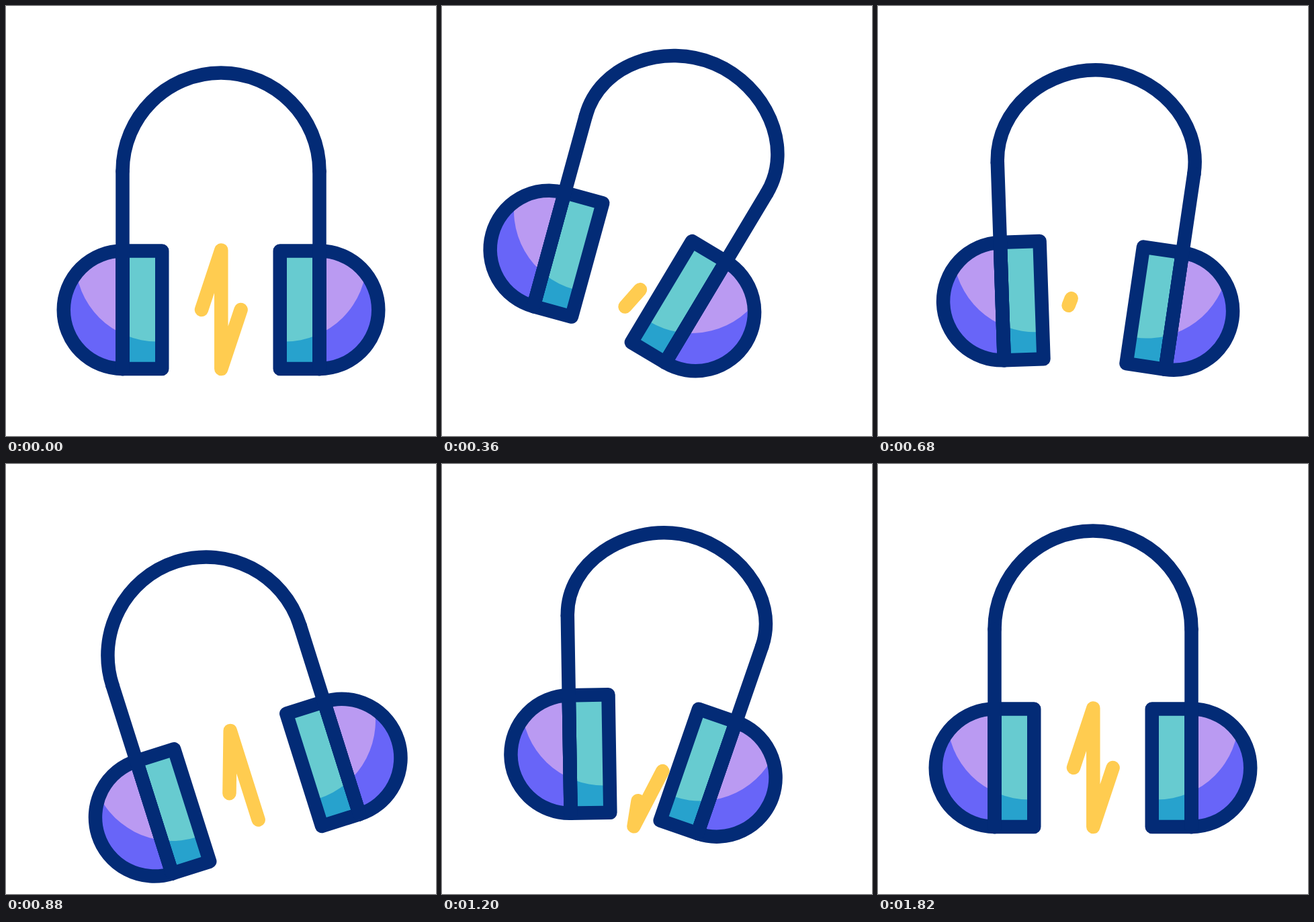
Recreate the animation shown at these times as an HTML page. Size 640 by 640 pixels, loop 2400 ms.

```html
<!DOCTYPE html>
<html lang="en">
<head>
<meta charset="utf-8">
<title>Headphones</title>
<style>
  html, body { margin: 0; width: 100%; height: 100%; overflow: hidden; background: #fff; }
  svg { display: block; width: 100vw; height: 100vh; }
  .line { fill: none; stroke: #032b76; stroke-width: 20.5; stroke-linecap: round; stroke-linejoin: round; }
  #bolt { stroke: #ffcc50; }
</style>
</head>
<body>
<svg viewBox="0 0 640 640">
  <defs>
    <clipPath id="lit"><circle cx="225" cy="377.8" r="121.8"/></clipPath>
    <path id="shell" d="M173.5 364.5A87.75 87.75 0 0 0 173.5 540Z"/>
    <path id="pad" d="M173.5 364.5h58.75V540H173.5Z"/>
    <g id="cup">
      <use href="#shell" fill="#6865f8"/>
      <use href="#pad" fill="#27a2cd"/>
      <g clip-path="url(#lit)">
        <use href="#shell" fill="#ba9af2"/>
        <use href="#pad" fill="#67cbd0"/>
      </g>
      <use href="#shell" class="line"/>
      <use href="#pad" class="line"/>
      <path class="line" d="M173.5 246V540"/>
    </g>
  </defs>
  <g id="body">
    <path id="band" class="line"/>
    <use id="left" href="#cup"/>
    <use id="right" href="#cup"/>
    <path id="bolt" class="line" pathLength="100" d="M291 452L320.3 363.5V540L349.6 452"/>
  </g>
</svg>
<script>
  const LOOP = 2400;
  const RADIUS = 146.5;
  const HANDLE = RADIUS * 0.5523;

  const [body, band, left, right, bolt] =
    ["body", "band", "left", "right", "bolt"].map(id => document.getElementById(id));

  // Sine ease from 0 to 1 between two times.
  function ease(t, from, to) {
    const p = Math.min(1, Math.max(0, (t - from) / (to - from)));
    return (1 - Math.cos(Math.PI * p)) / 2;
  }

  // Rises to 1 at the peak and falls back to 0.
  const bump = (t, from, peak, to) => ease(t, from, peak) - ease(t, peak, to);

  // Overlapping bumps blend into one decaying swing.
  const tilt = t => 25.3 * bump(t, 0, 445, 911) - 18 * bump(t, 445, 911, 1190)
    + 9.1 * bump(t, 911, 1190, 1500) - 3.9 * bump(t, 1190, 1500, 1820);
  const lift = t => 37 * bump(t, 480, 920, 1250) - 36 * bump(t, 0, 480, 920);
  const squeeze = t => 9.3 * bump(t, 0, 490, 900) + 10 * bump(t, 900, 1195, 1585);

  // Visible part of the bolt: wiped from its start, then drawn again, twice.
  function boltSpan(t) {
    if (t < 450) return [ease(t, 0, 450), 1];
    if (t < 1052) return [0, ease(t, 634, 1052)];
    if (t < 1305) return [ease(t, 1052, 1305), 1];
    return [0, ease(t, 1305, 1692)];
  }

  // The arc ends follow the direction of the legs.
  function bandPath(angle) {
    const turn = angle * Math.PI / 180;
    const dx = HANDLE * Math.sin(turn);
    const y = 246 - HANDLE * Math.cos(turn);
    const x0 = 320 - RADIUS, x1 = 320 + RADIUS, top = 246 - RADIUS;
    return `M${x0} 246C${x0 - dx} ${y} ${320 - HANDLE} ${top} 320 ${top}` +
      `S${x1 + dx} ${y} ${x1} 246`;
  }

  function draw(t) {
    const angle = squeeze(t);
    const swing = `rotate(${-angle} 173.5 246)`;
    body.setAttribute("transform", `translate(0 ${lift(t)}) rotate(${tilt(t)} 320 319)`);
    band.setAttribute("d", bandPath(angle));
    left.setAttribute("transform", swing);
    right.setAttribute("transform", `translate(640 0) scale(-1 1) ${swing}`);

    const [start, end] = boltSpan(t);
    const shown = 100 * (end - start);
    bolt.style.visibility = shown > 0.1 ? "visible" : "hidden";
    bolt.setAttribute("stroke-dasharray", shown > 99.9 ? "none" : `${shown} 300`);
    bolt.setAttribute("stroke-dashoffset", -100 * start);
  }

  const begin = performance.now();
  function tick() {
    draw((performance.now() - begin) % LOOP);
    requestAnimationFrame(tick);
  }
  draw(0);
  requestAnimationFrame(tick);
</script>
</body>
</html>
```
